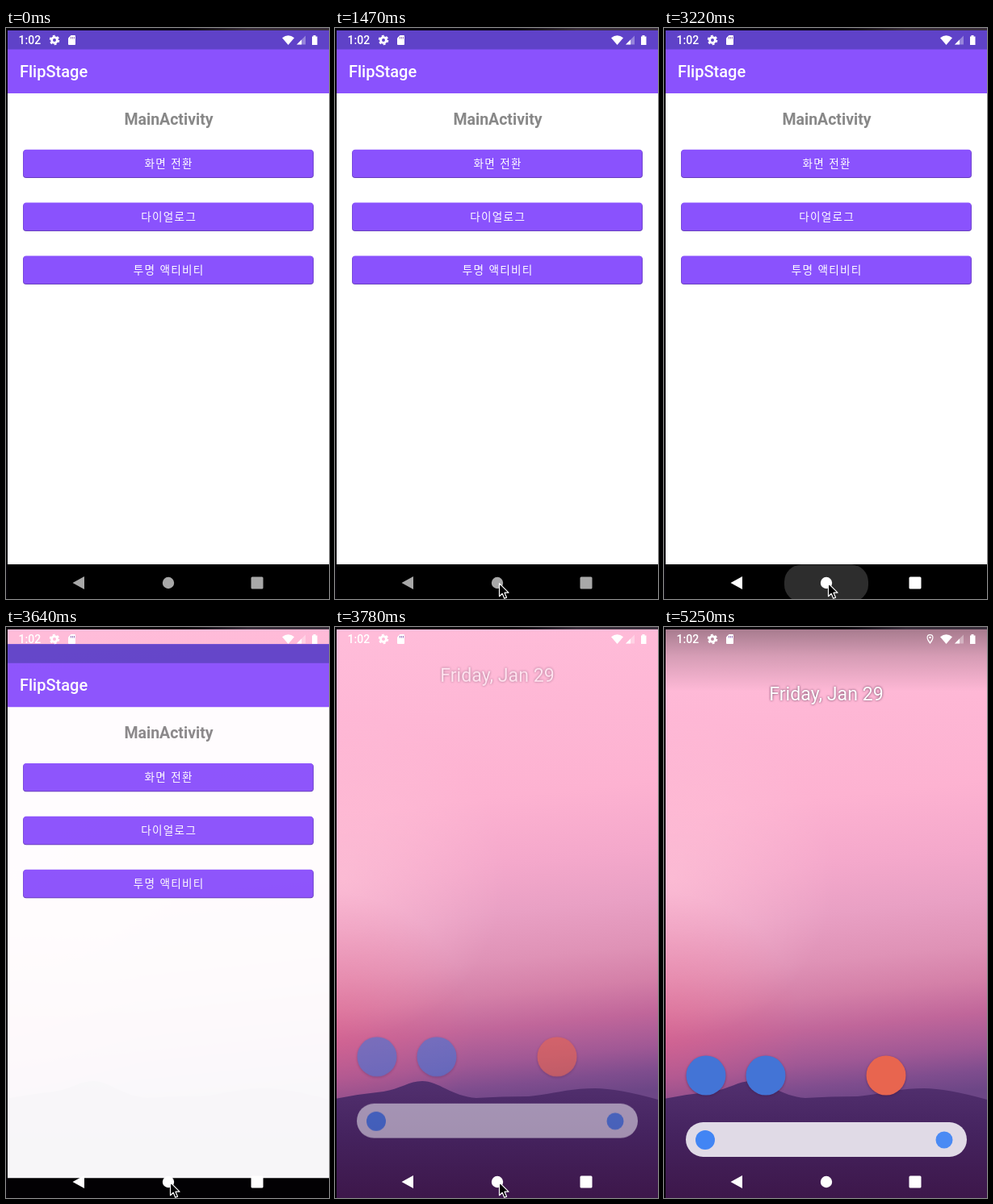
An HTML page for the animation above (5320 ms loop, 400 by 708 pixels).

```html
<!DOCTYPE html>
<html lang="ko">
<head>
<meta charset="utf-8">
<title>Home transition</title>
<style>
  html, body { margin: 0; width: 100%; height: 100%; overflow: hidden; background: #000; }
  svg { display: block; width: 100%; height: 100%; }
  text { font-family: Roboto, sans-serif; fill: #fff; }
  .mid { text-anchor: middle; }
  .label { font: 13.6px "Noto Sans CJK KR", "Noto Sans CJK", "Noto Sans CJK JP", sans-serif; letter-spacing: 1.3px; }
  .soft { filter: drop-shadow(0 1px 1.5px rgba(60, 20, 60, .45)); }
  .date { filter: drop-shadow(0 .5px 1.5px rgba(50, 20, 50, .75)); }
</style>
</head>
<body>
<svg viewBox="0 0 400 708">
  <defs>
    <linearGradient id="sky" gradientUnits="userSpaceOnUse" x1="170" y1="0" x2="230" y2="590">
      <stop offset="0" stop-color="#ffbcd9"/>
      <stop offset=".36" stop-color="#fdb2d1"/>
      <stop offset=".5" stop-color="#f4a8cb"/>
      <stop offset=".6" stop-color="#e9a0c4"/>
      <stop offset=".7" stop-color="#df92b6"/>
      <stop offset=".77" stop-color="#d480a8"/>
      <stop offset=".84" stop-color="#c0669a"/>
      <stop offset=".91" stop-color="#a05895"/>
      <stop offset=".96" stop-color="#7f4d8e"/>
      <stop offset="1" stop-color="#6c4686"/>
    </linearGradient>
    <radialGradient id="glow" gradientUnits="userSpaceOnUse" cx="10" cy="310" r="200">
      <stop offset="0" stop-color="#ffc4d8" stop-opacity=".65"/>
      <stop offset="1" stop-color="#ffc4d8" stop-opacity="0"/>
    </radialGradient>
    <radialGradient id="dusk" gradientUnits="userSpaceOnUse" cx="0" cy="500" r="170">
      <stop offset="0" stop-color="#e85c85" stop-opacity=".4"/>
      <stop offset="1" stop-color="#e85c85" stop-opacity="0"/>
    </radialGradient>
    <linearGradient id="hill" x2="0" y2="1">
      <stop offset="0" stop-color="#52306f"/>
      <stop offset=".45" stop-color="#45235f"/>
      <stop offset="1" stop-color="#3d174a"/>
    </linearGradient>
    <linearGradient id="shade" x2="0" y2="1">
      <stop offset="0" stop-opacity=".36"/>
      <stop offset=".45" stop-opacity=".16"/>
      <stop offset="1" stop-opacity="0"/>
    </linearGradient>
    <linearGradient id="edge">
      <stop offset=".55" stop-color="#050308"/>
      <stop offset=".75" stop-color="#3a2f3c"/>
    </linearGradient>
  </defs>

  <g id="wallpaper">
    <rect width="400" height="708" fill="url(#sky)"/>
    <rect width="400" height="708" fill="url(#glow)"/>
    <rect width="400" height="708" fill="url(#dusk)"/>
    <path fill="url(#hill)" d="M0 585Q30 579 60 576C80 573 92 563 108 563C128 563 145 582 175 584Q205 582 240 582C270 579 290 572 322 572Q350 572 400 586V708H0Z"/>
  </g>

  <rect id="scrim" width="400" height="80" fill="url(#shade)"/>

  <g id="launcher">
    <text class="mid date" x="201" y="91" font-size="23.2">Friday, Jan 29</text>
    <g class="soft">
      <circle cx="52" cy="556" r="24.5" fill="#4374d6"/>
      <circle cx="126" cy="556" r="24.5" fill="#4374d6"/>
      <circle cx="275" cy="556" r="24.5" fill="#e8654f"/>
    </g>
    <rect x="27" y="614" width="348" height="43" rx="21.5" fill="#e0dae6"/>
    <circle cx="51" cy="636" r="12" fill="#4285f4"/>
    <circle cx="347" cy="636" r="10.5" fill="#4a8af4"/>
  </g>

  <g id="app">
    <rect width="400" height="800" y="3" fill="#fff"/>
    <rect width="400" height="78" y="3" fill="#8a52fd"/>
    <rect width="400" height="23.5" y="3" fill="#5f42c8"/>
    <text x="17" y="61" font-size="20" font-weight="500">FlipStage</text>
    <text class="mid" x="201.5" y="120" font-size="19.5" font-weight="700" style="fill:#888">MainActivity</text>
    <g id="buttons"></g>
    <rect width="400" height="43" y="665"/>
  </g>

  <g id="status" fill="#fff">
    <text x="15.5" y="20" font-size="14" font-weight="500">1:02</text>
    <circle cx="60" cy="15" r="3.4" fill="none" stroke="#fff" stroke-width="2.8"/>
    <circle cx="60" cy="15" r="5.3" fill="none" stroke="#fff" stroke-width="2" stroke-dasharray="2.8 2.75"/>
    <path d="M80.500 9H85q1 0 1 1V20q0 1-1 1H78q-1 0-1-1V12.500Z"/>
    <path d="M80.500 11v2.500M82.500 11v2.500M84.500 11v2.500" stroke="#8860b0" stroke-width=".9"/>
    <path d="M342 12.300Q349.500 6 357 12.300L349.500 21Z"/>
    <path d="M360 20.500H371V9.500Z" opacity=".35"/>
    <path d="M360 20.500H366V14.500Z"/>
    <path d="M379 10.500h1.500V9h3v1.500H385.500V21H379Z"/>
    <path id="pin" fill-rule="evenodd" d="M329.500 21C327 17.500 325.500 15.500 325.500 13a4 4 0 0 1 8 0C333.500 15.500 332 17.500 329.500 21ZM329.500 18.700C331 16.500 332.300 14.700 332.300 13a2.800 2.800 0 0 0-5.600 0C326.700 14.700 328 16.500 329.500 18.700ZM328.200 13a1.300 1.300 0 1 0 2.600 0a1.300 1.300 0 1 0-2.600 0Z"/>
  </g>

  <rect id="ripple" x="-52" y="-22.500" width="104" height="46" rx="21" fill="#fff"/>
  <g id="nav" fill="#fff">
    <path d="M82.500 688L97 680V696Z"/>
    <circle cx="201" cy="688" r="7.200"/>
    <rect x="303.500" y="680.500" width="15" height="15" rx="1.500"/>
  </g>

  <path id="cursor" d="M0 0V16L3.700 12.600L6.200 18.600L9 17.400L6.500 11.500H11.500Z" stroke="#fff" stroke-width="1.200" stroke-linejoin="round"/>
  <rect width="400" height="3" fill="url(#edge)"/>
  <rect width="2" height="708" fill="#050308"/>
</svg>

<script>
const LOOP = 5320, STEP = 70;
const $ = id => document.getElementById(id);
const set = (id, attrs) => {
  for (const name in attrs) $(id).setAttribute(name, attrs[name]);
};
const ramp = (t, from, to) => Math.min(1, Math.max(0, (t - from) / (to - from)));
const easeOut = (u, power = 2) => 1 - (1 - u) ** power;
const mix = (a, b, u) => a + (b - a) * u;

$('buttons').innerHTML = ['화면 전환', '다이얼로그', '투명 액티비티'].map((label, i) => {
  const y = 150.7 + 65.9 * i;
  return `<rect x="21" y="${y + .6}" width="360" height="34.800" rx="4" fill="#6740bd"/>
    <rect x="21.500" y="${y}" width="358.800" height="34.400" rx="3.500" fill="#8a52fd"/>
    <text class="mid label" x="201.700" y="${y + 22.2}">${label}</text>`;
}).join('');

function draw(t) {
  // The app window drops and fades while the launcher settles from above.
  const leave = ramp(t, 3570, 3710);
  set('app', {
    transform: `translate(0 ${73 * leave ** 2})`,
    opacity: t < 3780 ? 1 - .3 * leave ** 3 : 0
  });
  set('launcher', {
    transform: `translate(0 ${-48.6 * (1 - easeOut(ramp(t, 3672, 4022)))})`,
    opacity: ramp(t, 3672, 3850)
  });
  set('scrim', { opacity: ramp(t, 4600, 5200) });
  set('pin', { opacity: t < 4830 ? 0 : 1 });

  // Touching the dimmed navigation bar brightens it and grows the ripple.
  set('nav', { opacity: mix(.66, 1, ramp(t, 2660, 2910)) });
  set('ripple', {
    transform: `translate(201 688) scale(${mix(.3, 1, easeOut(ramp(t, 2660, 3010), 3))})`,
    opacity: .2 * ramp(t, 2660, 2800) * (1 - ramp(t, 3170, 3620))
  });

  const enter = easeOut(ramp(t, 840, 1470));
  const exit = ramp(t, 4760, 5040) ** 2;
  const x = mix(300, 203.5, enter) + 60 * exit;
  const y = mix(712, 688.7, enter) + 26 * exit;
  set('cursor', { transform: `translate(${x} ${y})` });
}

function tick() {
  const t = performance.now() % LOOP;
  draw(Math.floor(t / STEP) * STEP);
  requestAnimationFrame(tick);
}
tick();
</script>
</body>
</html>
```
